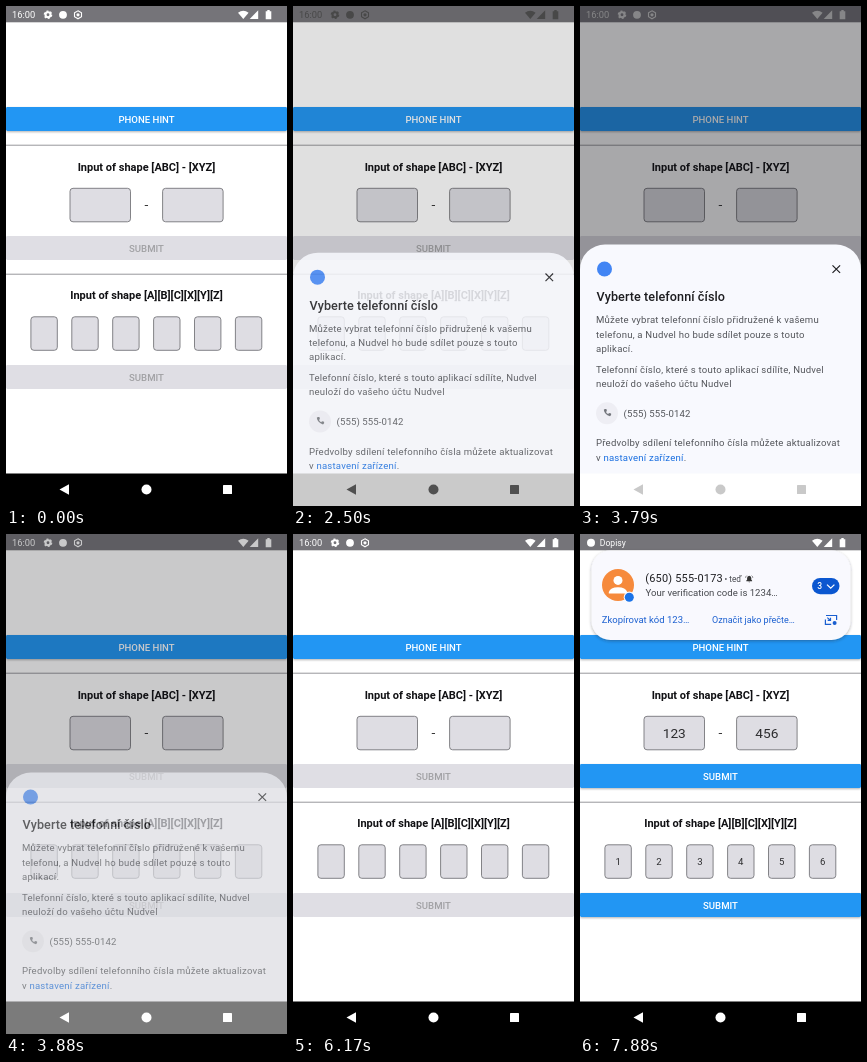
Write an HTML page that moves like this. It is 281 px wide and 500 px high and loops after 8000 ms.

```html
<!DOCTYPE html>
<html lang="cs">
<head>
<meta charset="utf-8">
<title>Phone hint demo</title>
<style>
  html, body { margin: 0; width: 100%; height: 100%; overflow: hidden; background: #fff; }
  svg { display: block; width: 100%; height: 100%; }
  text { font-family: Roboto, "Noto Sans", sans-serif; white-space: pre; }
</style>
</head>
<body>
<svg id="stage" viewBox="0 0 281 500" xmlns="http://www.w3.org/2000/svg">
  <defs>
    <filter id="lift" x="-10%" y="-30%" width="120%" height="180%">
      <feDropShadow dx="0" dy="1" stdDeviation="0.9" flood-color="#000" flood-opacity=".3"/>
    </filter>
    <filter id="cardLift" x="-10%" y="-20%" width="120%" height="150%">
      <feDropShadow dx="0" dy="1.2" stdDeviation="1.8" flood-color="#223" flood-opacity=".38"/>
    </filter>
  </defs>
  <rect width="281" height="500" fill="#fff"/>
  <g id="page"></g>
  <g id="bar"></g>
  <rect id="scrim" width="281" height="500" fill="#101016" opacity="0"/>
  <g id="sheet"></g>
  <rect id="nav" y="467.5" width="281" height="32.5"/>
  <g id="keys">
    <path d="M53.5 483.5 L63 478.3 V488.7 Z"/>
    <circle cx="140.5" cy="483.5" r="5"/>
    <rect x="217" y="479" width="9" height="9" rx=".6"/>
  </g>
  <g id="card"></g>
</svg>
<script>
const LOOP = 8000;
const OPEN = { start: 2340, length: 320 };
const CLOSE = { start: 3835, length: 120 };
const DARKEN = { start: 2390, length: 100 };
const LIGHTEN = { start: 3660, length: 190 };
const SMS = 6540, FILL = 6580;
const SLIDE = { start: 6600, length: 400 };

const BLUE = '#2196f3';
const $ = id => document.getElementById(id);
const clamp = x => Math.min(1, Math.max(0, x));
const progress = (t, span) => clamp((t - span.start) / span.length);
const grey = v => `rgb(${v},${v},${v})`;

function label(x, y, size, fill, str, { weight = 400, anchor = 'start', gap = 0, cls = '' } = {}) {
  return `<text x="${x}" y="${y}" font-size="${size}" fill="${fill}" font-weight="${weight}"` +
    ` text-anchor="${anchor}" letter-spacing="${gap}" class="${cls}">${str}</text>`;
}

const centered = (y, size, fill, str, weight) =>
  label(140.5, y, size, fill, str, { weight, anchor: 'middle' });

const rule = y => `<rect y="${y}" width="281" height="1" fill="#98989c"/>`;

function button(y, str, active) {
  const look = active ? `fill="${BLUE}" filter="url(#lift)"` : 'fill="#dfdee4"';
  return `<rect y="${y}" width="281" height="24" rx="1.4" ${look}/>` +
    centered(y + 15.7, 9.58, active ? '#fff' : '#a1a1a4', str, 500);
}

function field(x, y, w, size, value) {
  return `<rect x="${x}" y="${y}" width="${w}" height="33.5" rx="3" fill="#dedde3" stroke="#77777b" stroke-width=".9"/>` +
    label(x + w / 2, y + 17 + size * .36, size, '#2c2c2e', value, { anchor: 'middle', cls: 'code' });
}

function gear(x, y, r) {
  return `<g transform="translate(${x} ${y})" fill="none" stroke="currentColor">` +
    `<circle r="${r * .6}" stroke-width="${r * .5}"/>` +
    `<circle r="${r * .9}" stroke-width="${r * .3}" stroke-dasharray="${r * .47}"/></g>`;
}

function buildPage() {
  const cells = [...'123456'].map((d, i) => field(24.9 + i * 40.9, 310.8, 26.4, 9.58, d)).join('');
  const submits = on => button(230, 'SUBMIT', on) + button(359, 'SUBMIT', on);
  $('page').innerHTML =
    button(101, 'PHONE HINT', true) + rule(138.7) +
    centered(164.6, 11, '#111114', 'Input of shape [ABC] - [XYZ]', 700) +
    field(64, 182.3, 60.5, 13.7, '123') + field(156.6, 182.3, 60.5, 13.7, '456') +
    centered(203.4, 13.7, '#333', '-') +
    rule(267.7) +
    centered(293.4, 11, '#111114', 'Input of shape [A][B][C][X][Y][Z]', 700) +
    cells +
    `<g id="idle">${submits(false)}</g><g id="ready">${submits(true)}</g>`;
}

function buildBar() {
  const ink = 'currentColor';
  $('bar').innerHTML =
    '<rect width="281" height="16.3" fill="#757479"/>' +
    `<g id="clock">${label(6, 12.2, 9.3, ink, '16:00')}${gear(42, 8.8, 4.1)}` +
    `<circle cx="57" cy="8.8" r="3.9" fill="${ink}"/>` +
    `<path d="M72 4.8 l3.5 2 v4 l-3.5 2 l-3.5 -2 v-4 Z" fill="none" stroke="${ink}" stroke-width="1.1"/>` +
    `<circle cx="72" cy="8.8" r="1.6" fill="${ink}"/></g>` +
    `<g id="ticker"><circle cx="11" cy="8.8" r="4" fill="${ink}"/>` +
    label(19.8, 12, 8.6, ink, 'Dopisy') + '</g>' +
    `<g fill="${ink}"><path d="M232 6.8 Q237.3 2.6 242.6 6.8 L237.3 13 Z"/>` +
    '<path d="M252.2 4.3 V13 H243.7 Z"/>' +
    '<path d="M259.7 5.2 h1.6 v-1.1 h2.4 v1.1 h1.6 v8 h-5.6 Z"/></g>';
}

const handset = '<path d="M23.8 403.7 q.6 4.8 6.2 6.6 l1.1 -1.2 v-1.5 l-2 -.5 l-1 .9 q-1.4 -.8 -2.1 -2.1 l.9 -1 l-.5 -2 h-1.5 Z" fill="#74777d"/>';

function buildSheet() {
  const body = [
    [317.4, 'Můžete vybrat telefonní číslo přidružené k vašemu'],
    [331.7, 'telefonu, a Nudvel ho bude sdílet pouze s touto'],
    [346, 'aplikací.'],
    [366.8, 'Telefonní číslo, které s touto aplikací sdílíte, Nudvel'],
    [381.2, 'neuloží do vašeho účtu Nudvel'],
    [440.4, 'Předvolby sdílení telefonního čísla můžete aktualizovat'],
    [454.7, 'v <tspan fill="#1a6fe0">nastavení zařízení</tspan>.'],
  ].map(([y, str]) => label(16, y, 9.58, '#54565b', str, { gap: .21 })).join('');
  $('sheet').innerHTML =
    '<path d="M0 570 V263.5 A25 25 0 0 1 25 238.5 H256 A25 25 0 0 1 281 263.5 V570 Z" fill="#f8f9fe"/>' +
    '<circle cx="24.5" cy="263" r="7.5" fill="#4285f4"/>' +
    '<path d="M252.5 259.3 l7.6 7.6 m0 -7.6 l-7.6 7.6" stroke="#1f1f22" stroke-width="1.2"/>' +
    label(16.5, 295.4, 12.6, '#1d1d20', 'Vyberte telefonní číslo', { weight: 500, gap: .08 }) + body +
    '<circle cx="27" cy="407.3" r="11" fill="#eeeef4"/>' + handset +
    label(43.6, 410.8, 9.6, '#54565b', '(555) 555-0142', { gap: .1 });
}

function buildCard() {
  $('card').innerHTML =
    '<rect x="11.5" y="16.5" width="259" height="89.5" rx="19" fill="#f9f9fe" filter="url(#cardLift)"/>' +
    '<circle cx="38" cy="51" r="16" fill="#f68a3c"/>' +
    '<circle cx="38" cy="46.4" r="4.5" fill="#fff"/>' +
    '<path d="M28.8 59.5 v-1.5 q1.5 -4.8 9.2 -4.8 q7.7 0 9.2 4.8 v1.5 Z" fill="#fff"/>' +
    '<circle cx="49.3" cy="63.2" r="5.6" fill="#f9f9fe"/><circle cx="49.3" cy="63.2" r="4.5" fill="#1a73e8"/>' +
    label(65.3, 47.8, 10.94, '#1f1f22', '(650) 555-0173', { gap: .2 }) +
    label(144.5, 47.5, 8.2, '#46484d', '• teď') +
    '<path d="M166.3 47.2 v-.7 l.8 -.8 v-1.7 q0 -1.8 2.1 -2.2 q2.1 .4 2.1 2.2 v1.7 l.8 .8 v.7 Z M168.4 47.7 h1.6 l-.8 .8 Z" fill="#333"/>' +
    '<path d="M165.6 43.8 q.1 -1.5 1.2 -2.2 m6 2.2 q-.1 -1.5 -1.2 -2.2" fill="none" stroke="#333" stroke-width=".6"/>' +
    label(65.6, 62, 9.58, '#46484d', 'Your verification code is 1234…') +
    '<rect x="232" y="44" width="27.5" height="16.2" rx="8.1" fill="#0b57d0"/>' +
    label(237.3, 55.2, 8.6, '#fff', '3', { weight: 500 }) +
    '<path d="M247 50.6 l3.7 3.5 l3.7 -3.5" fill="none" stroke="#fff" stroke-width="1.3"/>' +
    label(21.8, 89.4, 9.5, '#1a5fd0', 'Zkopírovat kód 123…') +
    label(132, 89.4, 9, '#1a5fd0', 'Označit jako přečte…') +
    '<g fill="none" stroke="#1a5fd0" stroke-width="1.2"><path d="M246 81.5 h10.6 v4.5 M245.4 85.5 v4.8 h5.8"/>' +
    '<path d="M247.3 83.6 l3.2 2.8 m0 -2.6 v2.6 h-2.8"/></g>' +
    '<circle cx="254.6" cy="89" r="2" fill="#1a5fd0"/>';
}

const show = (el, on) => el.setAttribute('visibility', on ? 'visible' : 'hidden');

function render(t) {
  const opening = progress(t, OPEN);
  const shown = 1 - progress(t, CLOSE);
  const alpha = Math.min(1, opening * 1.7) * shown;
  const drop = 54 * Math.pow(1 - opening, 2.7);

  $('scrim').setAttribute('opacity', .36 * Math.pow(opening, 1.5) * shown);
  $('sheet').setAttribute('opacity', alpha);
  $('sheet').setAttribute('transform', `translate(0 ${drop})`);
  $('nav').setAttribute('fill', grey(Math.round(255 * Math.pow(alpha, 1.5))));

  // System icons turn dark while the sheet is up.
  const dark = progress(t, DARKEN) * (1 - progress(t, LIGHTEN));
  const ink = grey(Math.round(255 - 175 * dark));
  $('keys').setAttribute('fill', ink);
  $('bar').setAttribute('color', ink);

  const filled = t >= FILL;
  codes.forEach(el => show(el, filled));
  show($('idle'), !filled);
  show($('ready'), filled);
  show($('clock'), t < SMS);
  show($('ticker'), t >= SMS);

  const slide = Math.pow(1 - progress(t, SLIDE), 3);
  show($('card'), t >= SLIDE.start);
  $('card').setAttribute('transform', `translate(0 ${-112 * slide})`);
}

buildPage();
buildBar();
buildSheet();
buildCard();
const codes = document.querySelectorAll('.code');
const begin = performance.now();

function tick() {
  render((performance.now() - begin) % LOOP);
  requestAnimationFrame(tick);
}
tick();
</script>
</body>
</html>
```
